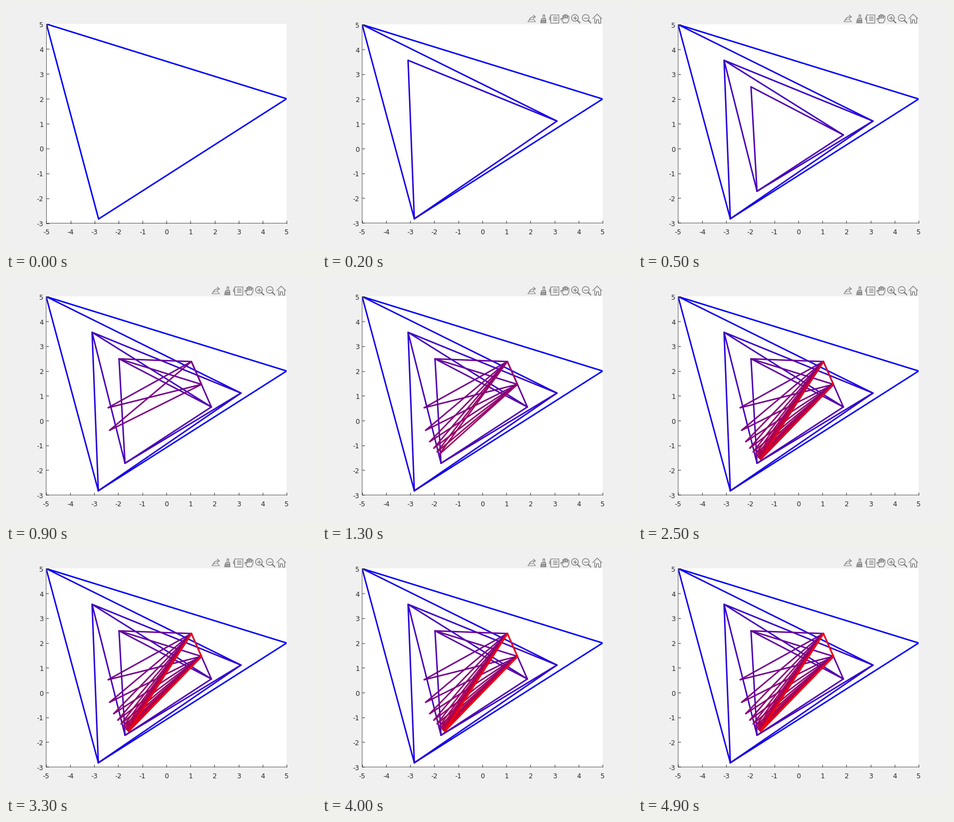
Animation, 570 px wide and 450 px high, one loop 5 s. Source, as a matplotlib script:

```python
import numpy as np
import matplotlib.pyplot as plt
from matplotlib.animation import FuncAnimation
from matplotlib.patches import Circle, Polygon, Rectangle

W, H, DPI = 570, 450, 100
FRAMES, INTERVAL = 50, 100
PX = 72 / DPI  # one pixel in points
BG, INK, ICON = "#f0f0f0", "#262626", "#686868"

fig = plt.figure(figsize=(W / DPI, H / DPI), dpi=DPI, facecolor=BG)
ax = fig.add_axes([0, 0, 1, 1])


def triangles():
    """Yield one triangle per step; each step moves a single corner."""
    tri = np.array([(-5, 5), (5, 2), (-2.828, -2.828)], float)
    yield tri.copy()

    # The corners take turns moving inwards, then the third one flips over.
    turns = [(1, (3.1, 1.11)), (0, (-3.09, 3.56)), (2, (-1.715, -1.715)),
             (1, (1.87, 0.55)), (0, (-1.97, 2.486)), (2, (1.04, 2.38))]
    for corner, point in turns:
        tri[corner] = point
        yield tri.copy()
    tri[1] = (tri[1] + tri[2]) / 2
    yield tri.copy()

    # The free corner glides to rest as a damped second-order system.
    rest = np.array([-1.56, -1.56])
    prev, cur = tri[0] - rest, np.array([-2.42, 0.52]) - rest
    while True:
        tri[0] = rest + cur
        yield tri.copy()
        prev, cur = cur, 1.05 * cur - 0.25 * prev


def tint(step):
    t = min(1, (1 - np.exp(-step / 15)) / (1 - np.exp(-40 / 15)))
    return (t, 0, 1 - t)


def edges_until(step):
    """Visible edges; a retraced edge only keeps its newest colour."""
    edges = {}
    for i, tri in zip(range(step + 1), triangles()):
        pts = [tuple(p) for p in tri.round(2)]
        for a, b in zip(pts, pts[1:] + pts[:1]):
            key = (min(a, b), max(a, b))
            edges.pop(key, None)
            edges[key] = tint(i)
    return edges.items()


def path(points, color=ICON, width=1.1, closed=False, **kw):
    pts = list(points) + ([points[0]] if closed else [])
    return ax.plot(*zip(*pts), color=color, lw=width * PX, **kw)[0]


def mirrored(cx, half):
    """Polyline through a half outline and its reflection about cx."""
    return ([(cx - dx, y) for dx, y in half]
            + [(cx + dx, y) for dx, y in half[::-1]])


def box(x, y, w, h, fill="none", edge=ICON, z=1):
    patch = Rectangle((x, y), w, h, fc=fill, ec=edge, lw=PX, zorder=z)
    return ax.add_patch(patch)


def label(x, y, value, align):
    ax.text(x, y, str(value), ha=align, va="baseline", color=INK,
            family="DejaVu Sans", size=12.3 * PX)


def export_icon(x, y):
    path(mirrored(x, [(4, y + 2), (7, y + 6)]), closed=True, color="#8a8a8a")
    t = np.linspace(0, np.pi / 2, 9)
    path(list(zip(x + 4 - 8 * np.cos(t), y + 3 - 6 * np.sin(t))))
    path([(x + 3, y - 6), (x + 7, y - 3), (x + 3, y)])


def brush_icon(x, y):
    path(mirrored(x, [(1.5, y), (1.5, y - 7)]))
    box(x - 4, y, 8, 3)
    ax.add_patch(Polygon(mirrored(x, [(4, y + 3), (5, y + 8)]),
                         fc="#a0a0a0", ec=ICON, lw=PX))


def note_icon(x, y):
    box(x - 7, y - 7.5, 15, 15)
    path([(x - 7, y - 3), (x - 8.5, y), (x - 7, y + 3)])
    for dy in (-3, 0, 3):
        path([(x - 2, y + dy), (x + 5, y + dy)])


def hand_icon(x, y):
    outline = [(x - 3, y + 8), (x - 8, y + 1), (x - 6, y - 0.5),
               (x - 4, y + 2)]
    for i in range(4):
        left = x - 4.5 + 3 * i
        top = y - 7.5 + (i - 1.4) ** 2
        outline += [(left, top + 1), (left + 1.2, top),
                    (left + 2.4, top + 1), (left + 2.7, y)]
    path(outline + [(x + 6.5, y + 4), (x + 4, y + 8)], closed=True)


def magnifier_icon(x, y, plus):
    ax.add_patch(Circle((x, y), 6.2, fill=False, ec=ICON, lw=1.1 * PX))
    path([(x + 4.5, y + 4.5), (x + 9, y + 9)], width=1.8)
    path([(x - 3, y), (x + 3, y)])
    if plus:
        path([(x, y - 3), (x, y + 3)])


def home_icon(x, y):
    path(mirrored(x, [(8, y), (0, y - 8)]))
    path(mirrored(x, [(5.5, y - 1), (5.5, y + 7.5), (1.8, y + 7.5),
                      (1.8, y + 2)]))


def toolbar():
    export_icon(385.5, 23)
    brush_icon(407, 23)
    note_icon(426.5, 23)
    hand_icon(447, 23)
    magnifier_icon(465, 22, True)
    magnifier_icon(485, 22, False)
    home_icon(506, 23)


def draw(step):
    ax.clear()
    ax.set(xlim=(0, W), ylim=(H, 0))
    ax.axis("off")

    # The plot area shifts slightly once the toolbar shows up.
    first = step == 0
    left, right = (74.4 if first else 73.8), 516
    top, bottom = (33.3, 400.6) if first else (34.3, 400.2)

    def to_px(x, y):
        return (left + (x + 5) / 10 * (right - left),
                bottom - (y + 3) / 8 * (bottom - top))

    area = box(left, top, right - left, bottom - top, "white", "none", 0)
    for ends, color in edges_until(step):
        line = path([to_px(*p) for p in ends], color=color, width=2.67,
                    solid_capstyle="round", zorder=2)
        line.set_clip_path(area)

    path([(left, top), (left, bottom), (right, bottom)], color="#5a5a5a",
         width=1, zorder=3, snap=False)
    tick = dict(color=INK, width=0.9, zorder=3, snap=True)
    for v in range(-5, 6):
        x, _ = to_px(v, 0)
        path([(x, bottom), (x, bottom - 4.5)], **tick)
        label(x, bottom + 20.6, v, "center")
    for v in range(-3, 6):
        _, y = to_px(0, v)
        path([(left, y), (left + 4.5, y)], **tick)
        label(69, y + 5.6, v, "right")

    if not first:
        toolbar()
    return ax.get_children()


anim = FuncAnimation(fig, draw, frames=FRAMES, interval=INTERVAL,
                     repeat=True, repeat_delay=0, blit=False,
                     init_func=lambda: draw(0))
plt.show()
```
